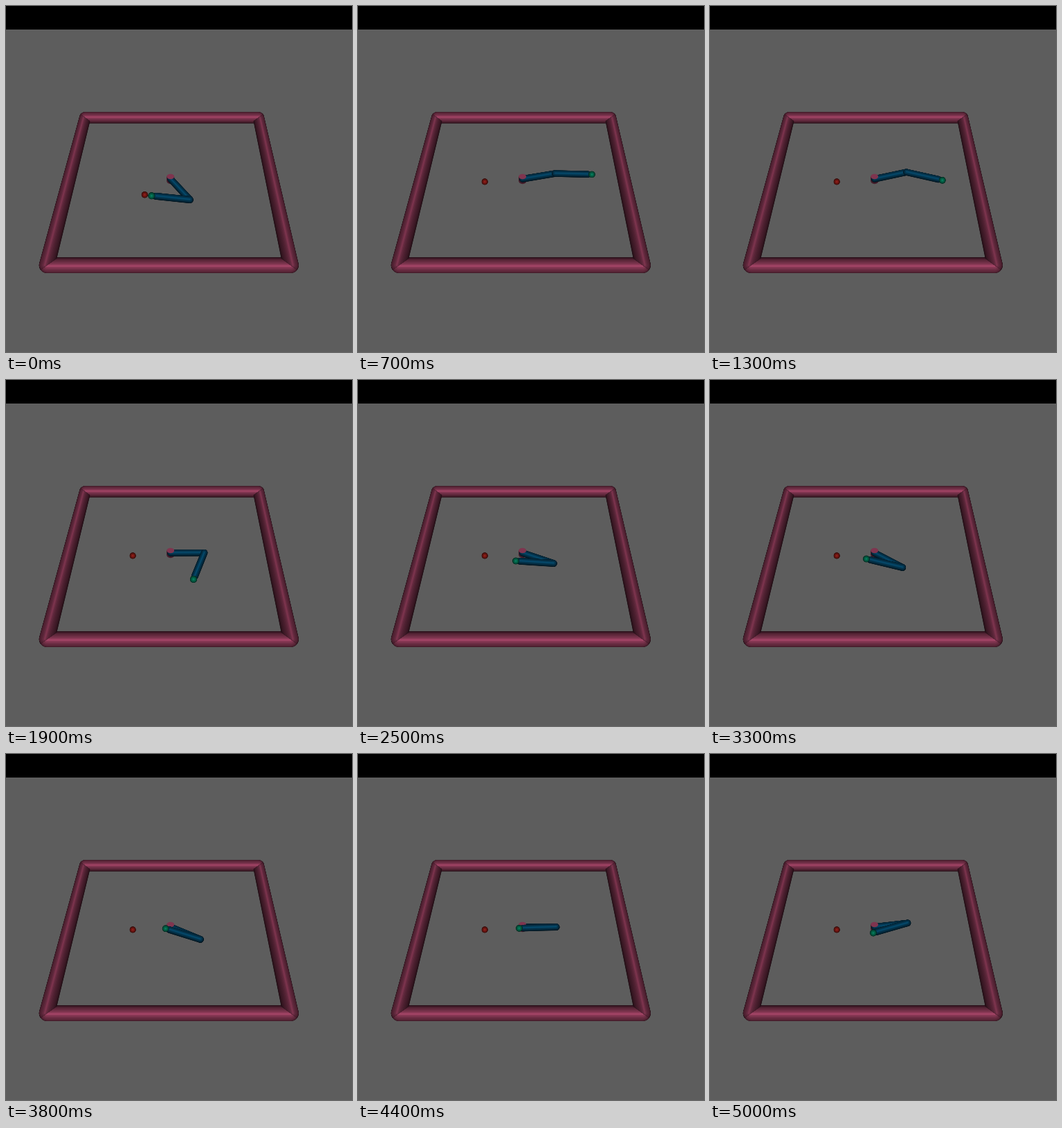
An HTML page with a canvas that plays this animation: 500 by 500 pixels, repeating every 5.1 s.

```html
<!DOCTYPE html>
<html lang="en">
<head>
<meta charset="utf-8">
<title>Two-link arm</title>
<style>
  html, body { margin: 0; width: 100%; height: 100%; overflow: hidden; background: #000; }
  canvas { display: block; width: 500px; height: 500px; }
</style>
</head>
<body>
<canvas id="stage" width="500" height="500"></canvas>
<script>
const ctx = document.getElementById('stage').getContext('2d');
const LOOP = 5100, STEP = 100, RAD = Math.PI / 180;
const PINK = [230, 96, 144], BLUE = [8, 106, 156], GREEN = [10, 204, 150], RED = [236, 50, 42];
const HALF = 0.3, BAR = 0.0195, LINK = 0.0097;

// Camera tilted 45 degrees, heights measured from the arm's plane
function project(x, y, z = 0) {
  const depth = 1.26 + (y - z) * Math.SQRT1_2;
  const scale = 615 / depth;
  return {
    x: 250 + (x - 0.025) * scale,
    y: 250 - (y + z) * Math.SQRT1_2 * scale,
    scale
  };
}

const shade = (color, level) => `rgb(${color.map(v => Math.round(v * level))})`;

// Shaded round-ended bar; light shifts the bright part, in radii
function capsule(a, b, radius, color, { light = [0, 0], gain = 1 } = {}) {
  const p = project(...a), q = project(...b);
  const dir = Math.atan2(q.y - p.y, q.x - p.x), turn = Math.PI / 2;
  const layers = 12;
  for (let i = 0; i < layers; i++) {
    const k = i / (layers - 1);
    const size = Math.cos(k * 1.45), facing = Math.sin(k * 1.45);
    const [dx, dy] = light.map(v => Math.sign(v) * Math.min(0.8 * (1 - size), Math.abs(v)));
    const end = (c, from, to) => {
      const r = radius * c.scale;
      ctx.arc(c.x + dx * r, c.y + dy * r, r * size, from, to);
    };
    ctx.beginPath();
    end(p, dir + turn, dir - turn);
    end(q, dir - turn, dir + turn);
    ctx.fillStyle = shade(color, gain * (0.14 + 0.38 * facing + 0.18 * k ** 8));
    ctx.fill();
  }
}

const ball = (at, radius, color) => capsule(at, at, radius, color);

function drawArena() {
  ctx.fillStyle = '#000';
  ctx.fillRect(0, 0, 500, 34);
  ctx.fillStyle = '#5d5d5d';
  ctx.fillRect(0, 34, 500, 466);

  for (const s of [1, -1]) {
    capsule([-HALF, s * HALF], [HALF, s * HALF], BAR, PINK, { light: [0, -s * 0.1] });
  }
  // Side bars meet the others along the corner diagonals
  for (const s of [-1, 1]) {
    ctx.save();
    ctx.beginPath();
    for (const y of [0, 0.4, -0.4]) {
      const p = project(s * Math.abs(y), y);
      ctx.lineTo(p.x, p.y);
    }
    ctx.clip();
    capsule([s * HALF, HALF], [s * HALF, -HALF], BAR, PINK, { light: [s * 0.28, 0], gain: 0.76 });
    ctx.restore();
  }
}

function drawHub(z, level) {
  const p = project(0, 0, z), r = 0.011 * p.scale;
  ctx.beginPath();
  ctx.ellipse(p.x, p.y, r, r * Math.SQRT1_2, 0, 0, 2 * Math.PI);
  ctx.fillStyle = shade(PINK, level);
  ctx.fill();
}

// Cosine ease from 0 to 1 between two times
function ease(t, from, to) {
  const u = Math.min(1, Math.max(0, (t - from) / (to - from)));
  return (1 - Math.cos(Math.PI * u)) / 2;
}

// Shoulder lifts, drops, then lifts again
const shoulder = t =>
  -9.2 + 26.4 * ease(t, -1100, 1300) - 53.2 * ease(t, 1200, 3050) + 45.6 * ease(t, 3500, 4800);

// Forearm sags, folds back to its stop, then follows the shoulder
const forearm = t =>
  3 - 34 * ease(t, 100, 2500) - 156 * ease(t, 1150, 2600)
  - 16.5 * ease(t, 2500, 3800) + 45.5 * ease(t, 3800, 4900);

const along = ([x, y], angle, length) =>
  [x + Math.cos(angle * RAD) * length, y + Math.sin(angle * RAD) * length];

function draw(t) {
  // The loop opens on a reached goal, then everything resets
  const reached = t < STEP;
  const upper = reached ? -56.1 : shoulder(t);
  const fore = reached ? -188 : forearm(t);
  const goal = reached ? [-0.073, -0.0637] : [-0.111, -0.0112];
  const elbow = along([0, 0], upper, 0.1);
  const light = [0, -0.15];

  drawArena();
  for (let z = -0.01; z < 0.009; z += 0.002) drawHub(z, 0.3);
  capsule([0, 0], elbow, LINK, BLUE, { light });
  drawHub(0.01, 0.55);
  capsule(elbow, along(elbow, fore, 0.098), LINK, BLUE, { light });
  ball(along(elbow, fore, 0.11), LINK, GREEN);
  ball(goal, 0.009, RED);
}

let shown = -1;
const origin = performance.now();
function tick() {
  const t = Math.floor(((performance.now() - origin) % LOOP) / STEP) * STEP;
  if (t !== shown) draw(shown = t);
  requestAnimationFrame(tick);
}
tick();
</script>
</body>
</html>
```
